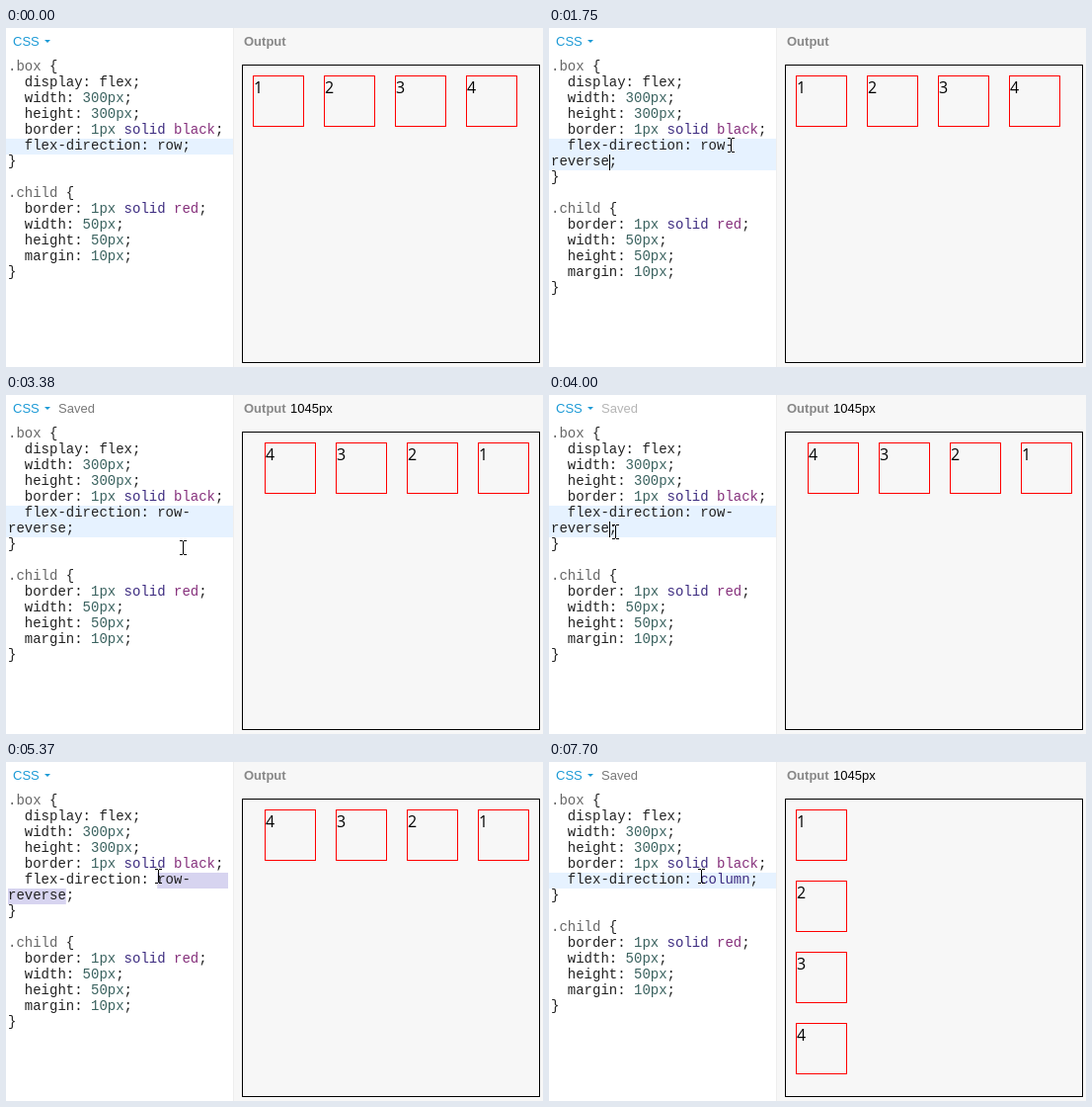
Write an HTML page with a canvas that moves like this. It is 544 by 343 pixels and loops after 8000 ms.

```html
<!DOCTYPE html>
<html lang="en">
<head>
<meta charset="utf-8">
<title>flex-direction demo</title>
<style>
html, body { margin: 0; width: 100%; height: 100%; overflow: hidden; background: #fff; }
canvas { display: block; }
</style>
</head>
<body>
<canvas id="stage" width="544" height="343"></canvas>
<script>
const ctx = document.getElementById('stage').getContext('2d');
const LOOP = 8000, CHAR = 8.4, LEFT = 2, TOP = 32, LINE = 16, VALUE_COL = 18;
const MONO = '14px "Liberation Mono", monospace';
const UI = '13px "Liberation Sans", Arial, sans-serif';
const DIGITS = '16px "Open Sans", sans-serif';

const before = ['.box {', '  display: flex;', '  width: 300px;', '  height: 300px;', '  border: 1px solid black;'];
const after = ['}', '', '.child {', '  border: 1px solid red;', '  width: 50px;', '  height: 50px;', '  margin: 10px;', '}'];
const tokens = [[/^\.\w+/, '#666'], [/^\d+px/, '#3a625f'], [/^(solid|column)\b/, '#3d2c80'], [/^(black|red)\b/, '#86307c']];

// [start, value]
const typed = [[0, 'row'], [1450, 'row-'], [1520, 'row-re'], [1600, 'row-rev'], [1670, 'row-rever'], [1750, 'row-reverse'],
  [6000, 'c'], [6150, 'co'], [6540, 'col'], [6770, 'colu'], [7070, 'colum'], [7240, 'column']];
const layouts = [[0, 'row'], [1900, 'row-reverse'], [6460, 'row'], [7470, 'column']];
// [start, end]
const caretOn = [[960, 2290], [2830, 3380], [3920, 4460], [6000, 7700]];
// [time, x, y]
const mousePath = [[350, 203, 334], [890, 177, 120], [1040, 184, 118], [1900, 184, 118], [2210, 180, 163], [2450, 176, 157],
  [2600, 176, 157], [2830, 179, 154], [3380, 179, 154], [3690, 38, 132], [3840, 38, 132], [4000, 67, 138], [4680, 67, 138],
  [5140, 156, 116], [5369, 156, 116], [5370, 154, 115], [6690, 154, 115], [6850, 154, 124], [7000, 154, 124], [7070, 154, 115]];

const clamp = v => Math.max(0, Math.min(1, v));
const stepValue = (steps, t) => steps.filter(s => s[0] <= t).pop()[1];
const within = (ranges, t) => ranges.some(([a, b]) => t >= a && t < b);
const colX = col => LEFT + col * CHAR;
const lineY = row => TOP + row * LINE;

function rect(x, y, w, h, color) {
  ctx.fillStyle = color;
  ctx.fillRect(x, y, w, h);
}

function frame(x, y, size, color) {
  ctx.strokeStyle = color;
  ctx.strokeRect(x + .5, y + .5, size - 1, size - 1);
}

function label(str, x, y, font, color) {
  ctx.font = font;
  ctx.fillStyle = color;
  ctx.fillText(str, x, y);
}

function codeLine(str, row) {
  for (let col = 0; col < str.length;) {
    const rest = str.slice(col);
    const hit = tokens.find(([re]) => re.test(rest) && !/\w/.test(str[col - 1] || ' '));
    const word = hit ? rest.match(hit[0])[0] : rest.match(/^([\w-]+|\s+|.)/)[0];
    label(word, colX(col), lineY(row) + 11, MONO, hit ? hit[1] : '#222');
    col += word.length;
  }
}

function mouseAt(t) {
  if (t < mousePath[0][0]) return null;
  const i = mousePath.findIndex(p => p[0] > t);
  if (i < 0) return mousePath[mousePath.length - 1].slice(1);
  const [t0, x0, y0] = mousePath[i - 1], [t1, x1, y1] = mousePath[i];
  const k = (t - t0) / (t1 - t0);
  return [x0 + (x1 - x0) * k, y0 + (y1 - y0) * k].map(Math.round);
}

function drawSelection([x, y]) {
  const color = '#d7d4f0', end = colX(7), row = 5;
  const x0 = colX(Math.round((x - LEFT) / CHAR));
  if (y < lineY(row + 1)) {
    rect(x0, lineY(row), 225 - x0, LINE, color);
    rect(LEFT, lineY(row + 1), end - LEFT, LINE, color);
  } else {
    const x1 = Math.min(x0, colX(8));
    rect(Math.min(x1, end), lineY(row + 1), Math.abs(x1 - end), LINE, color);
  }
}

function drawEditor(t, mouse) {
  const value = stepValue(typed, t);
  const wrapped = value.length > 7;
  const parts = wrapped ? ['row-', value.slice(4) + ';'] : [value + ';'];
  if (t >= 4720 && t < 6000) drawSelection(mouse);
  else rect(0, lineY(5), 230, LINE * parts.length, '#e6f2ff');

  const lines = [...before, '  flex-direction: ' + parts[0], ...parts.slice(1), ...after];
  lines.forEach(codeLine);

  if (within(caretOn, t)) {
    const col = wrapped ? value.length - 4 : VALUE_COL + value.length;
    rect(Math.round(colX(col)), lineY(wrapped ? 6 : 5), 1, LINE, '#000');
  }
}

function drawHeader(t) {
  label('CSS', 7, 18, UI, '#1c9ad6');
  ctx.beginPath();
  ctx.moveTo(39, 12);
  ctx.lineTo(45, 12);
  ctx.lineTo(42, 15);
  ctx.fill();
  label('Output', 241, 18, 'bold ' + UI, '#888');

  const saved = t >= 7470 ? 1 : t >= 2600 ? clamp((4200 - t) / 360) : 0;
  const size = t >= 6460 ? 1 : t >= 1900 ? clamp((4460 - t) / 380) : 0;
  ctx.globalAlpha = saved;
  label('Saved', 53, 18, UI, '#777');
  ctx.globalAlpha = size;
  label('1045px', 288, 18, UI, '#000');
  ctx.globalAlpha = 1;
}

function drawOutput(t) {
  const layout = stepValue(layouts, t);
  frame(239, 37, 302, '#000');
  for (let i = 0; i < 4; i++) {
    const x = layout === 'row' ? 250 + 72 * i : layout === 'column' ? 250 : 478 - 72 * i;
    const y = layout === 'column' ? 48 + 72 * i : 48;
    frame(x, y, 52, '#f00');
    label(i + 1, x + 1, y + 18, DIGITS, '#000');
  }
}

function drawMouse([x, y]) {
  rect(x, y - 6, 1, 13, '#000');
  for (const dy of [-7, 7]) {
    rect(x - 3, y + dy, 3, 1, '#000');
    rect(x + 1, y + dy, 3, 1, '#000');
  }
}

function draw(now) {
  const t = now % LOOP;
  const mouse = mouseAt(t);
  rect(0, 0, 544, 343, '#fff');
  rect(230, 0, 314, 343, '#f7f7f7');
  rect(230, 0, 1, 343, '#eee');
  drawEditor(t, mouse);
  drawHeader(t);
  drawOutput(t);
  if (mouse) drawMouse(mouse);
}

const start = performance.now();
function tick() {
  draw(performance.now() - start);
  requestAnimationFrame(tick);
}
tick();
</script>
</body>
</html>
```
